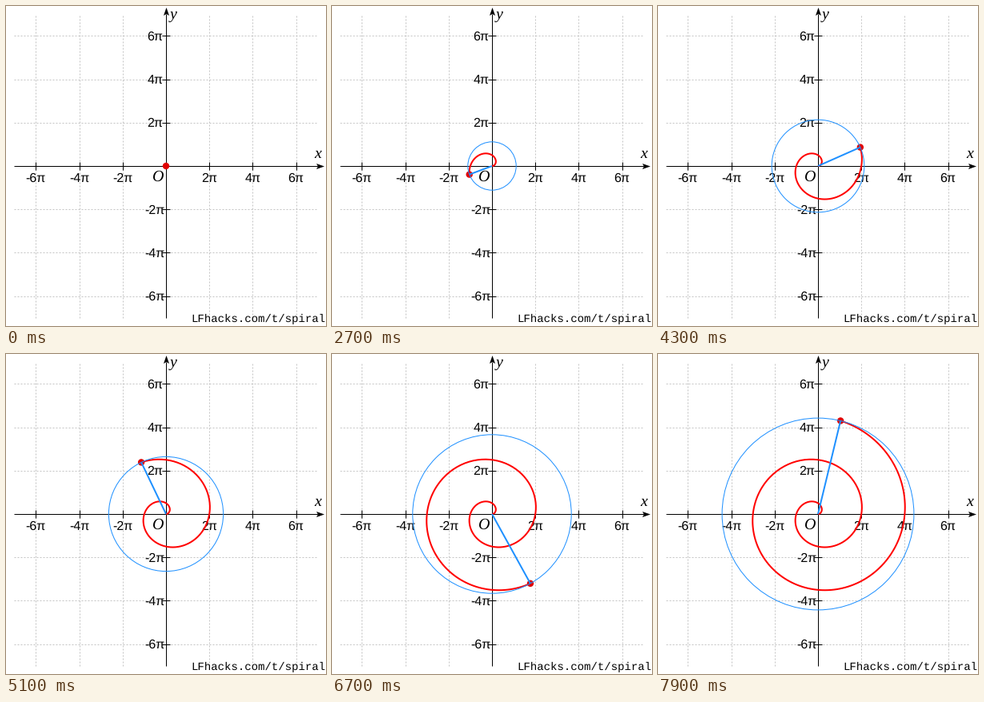
These frames come from a looping animation (400x400 px, 8 s). A matplotlib script:

```python
import numpy as np
import matplotlib.pyplot as plt
from matplotlib.animation import FuncAnimation
from matplotlib.patches import Circle, Polygon

plt.rcParams["text.hinting"] = "none"

SIZE, DPI = 400, 100
PX = 72 / DPI              # one pixel in points
C = 200                    # centre of the stage
MID = C + 0.5              # middle of the axis line's pixels
UNIT = 27.1 / np.pi        # pixels per radian
BLUE, RED = "#1e90ff", "#ff0000"

fig = plt.figure(figsize=(SIZE / DPI, SIZE / DPI), dpi=DPI, facecolor="white")
ax = fig.add_axes([0, 0, 1, 1])
ax.set_xlim(0, SIZE)
ax.set_ylim(SIZE, 0)
ax.axis("off")


def line(xs, ys, color="black", width=1, **kw):
    kw.setdefault("solid_capstyle", "butt")
    return ax.plot(xs, ys, color=color, lw=width * PX, **kw)[0]


def label(x, y, text, size=16, font="Liberation Sans", ha="center", **kw):
    ax.text(x, y, text, fontsize=size * PX, family=font, ha=ha,
            va="baseline", color="black", zorder=3, **kw)


def arrow(points):
    ax.add_patch(Polygon(points, fc="black", ec="none", zorder=2))


# Grid, ticks and tick labels
for n in (-6, -4, -2, 2, 4, 6):
    d = n * np.pi * UNIT
    grid = dict(color="#c4c4c4", dashes=(2, 2), zorder=1)
    line([C + d, C + d], [12, 390], **grid)
    line([10, 388], [C - d, C - d], **grid)
    line([C + d, C + d], [C - 5, C + 5], zorder=2)
    line([C - 5, C + 5], [C - d, C - d], zorder=2)
    text = f"{n}π"
    label(C + d, 220, text)
    label(196.5 if n > 0 else 198.5, C - d + 5.5, text, ha="right")

# Axes
line([10, 390], [C, C], zorder=2)
line([C, C], [10, 390], zorder=2)
arrow([(398, MID), (388, MID - 3.5), (390, MID), (388, MID + 3.5)])
arrow([(MID, 2), (MID - 3.5, 12), (MID, 10), (MID + 3.5, 12)])
for x, y, name in ((389.5, 189.5, "x"), (209.5, 15.5, "y"), (190.5, 219, "O")):
    label(x, y, name, 20, "Liberation Serif", style="italic")
label(399.5, 395.5, "LFhacks.com/t/spiral", 14, "Liberation Mono", ha="right")

# Moving parts
spiral = line([], [], RED, 2, zorder=4)
dot = Circle((C, C), 4.2, fc="#e00000", ec="none", zorder=5)
ring = Circle((C, C), 0, fc="none", ec=BLUE, lw=PX, zorder=6)
ax.add_patch(dot)
ax.add_patch(ring)
radius = line([], [], BLUE, 2, zorder=7)


def point(t):
    return C + UNIT * t * np.cos(t), C - UNIT * t * np.sin(t)


def update(i):
    theta = 0.1 + 0.2 * (i - 10) if i >= 10 else 0
    x, y = point(theta)
    spiral.set_data(*point(np.linspace(0, theta, 20 + int(theta * 25))))
    dot.center = x, y
    ring.set_radius(UNIT * theta)
    radius.set_data([C, x], [C, y])
    for part in (spiral, ring, radius):
        part.set_visible(theta > 0)
    return spiral, dot, ring, radius


anim = FuncAnimation(fig, update, frames=80, interval=100, repeat=True)
plt.show()
```
